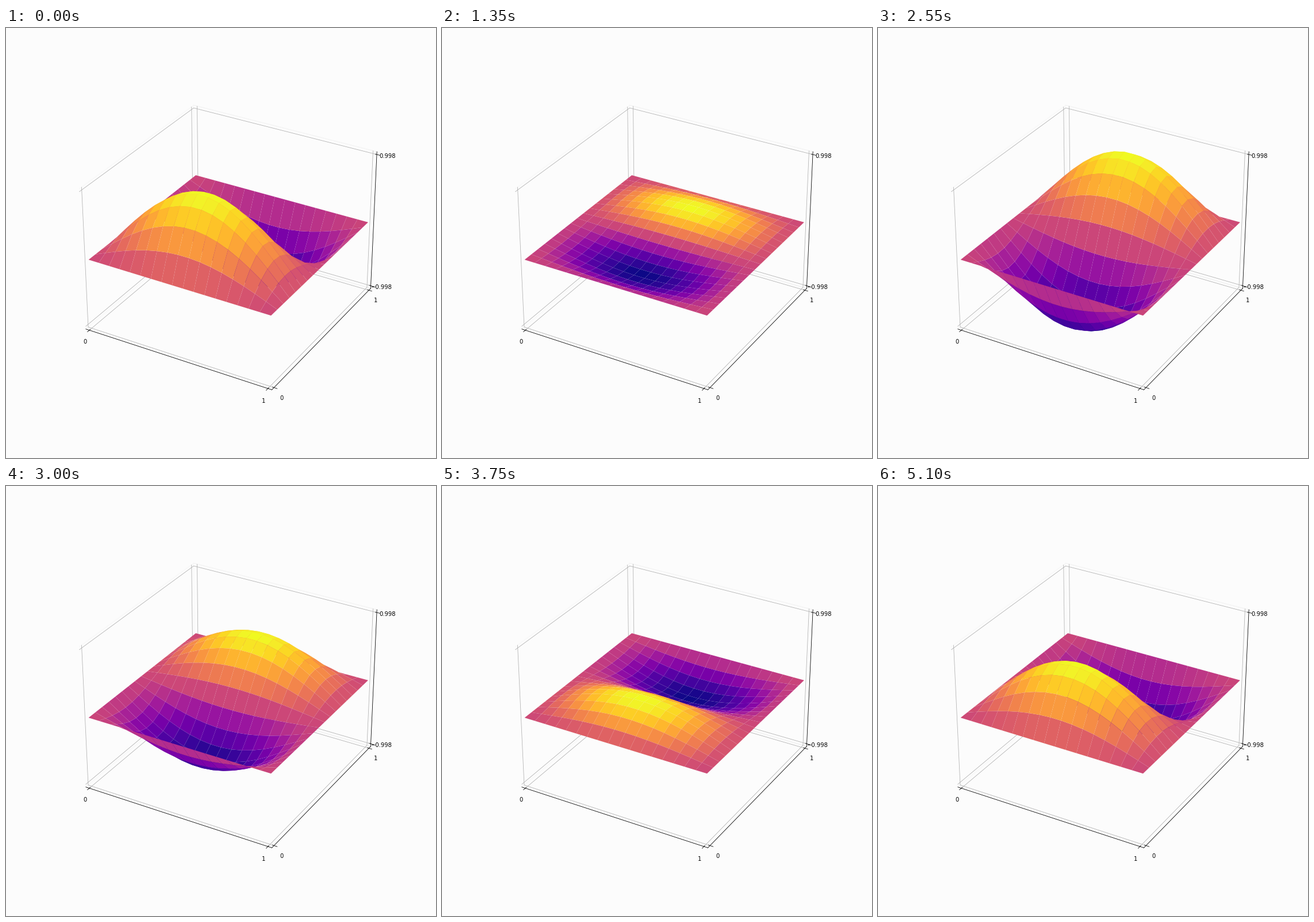
A matplotlib script that plays this animation: 748x748 px, repeating every 5250 ms.

```python
import numpy as np
import matplotlib.pyplot as plt
from matplotlib.animation import FuncAnimation

CELLS = 17       # grid cells per side
COURANT2 = 0.25  # squared Courant number of the wave scheme
PEAK = 0.998
FRAMES, STEP_MS = 35, 150
PAPER = "#fcfcfc"

plt.rcParams["font.family"] = "DejaVu Sans"
plt.rcParams["font.size"] = 10

axis = np.linspace(0, 1, CELLS + 1)
X, Y = np.meshgrid(axis, axis)
MODE = np.sin(np.pi * X) * np.sin(2 * np.pi * Y)

# Phase advance per step of the leapfrog scheme for this mode
k = np.pi / CELLS
OMEGA = np.arccos(1 - COURANT2 * (2 - np.cos(k) - np.cos(2 * k)))


def amplitude(step):
    """Leapfrog solution whose first two states are equal."""
    return np.cos(OMEGA * (step - 0.5)) / np.cos(OMEGA / 2)


def padded(lo, hi):
    pad = (hi - lo) / 48
    return lo - pad, hi + pad


fig = plt.figure(figsize=(10.39, 10.39), dpi=72, facecolor=PAPER)
ax = fig.add_subplot(projection="3d")
ax.set_facecolor(PAPER)
ax.view_init(elev=30, azim=-60)

ax.set_xticks([0, 1])
ax.set_yticks([0, 1])
ax.set_zticks([-PEAK, PEAK])
ax.set_xlim(*padded(0, 1))
ax.set_ylim(*padded(0, 1))
ax.set_zlim(*padded(-PEAK, PEAK))
for side in (ax.xaxis, ax.yaxis, ax.zaxis):
    side.pane.set_fill(False)

surface = None


def draw(step):
    global surface
    if surface is not None:
        surface.remove()
    surface = ax.plot_surface(X, Y, amplitude(step) * MODE, cmap="plasma",
                              rstride=1, cstride=1, linewidth=0)
    return [surface]


anim = FuncAnimation(fig, draw, frames=FRAMES, interval=STEP_MS,
                     init_func=lambda: draw(0), repeat=True, repeat_delay=0)
plt.show()
```
